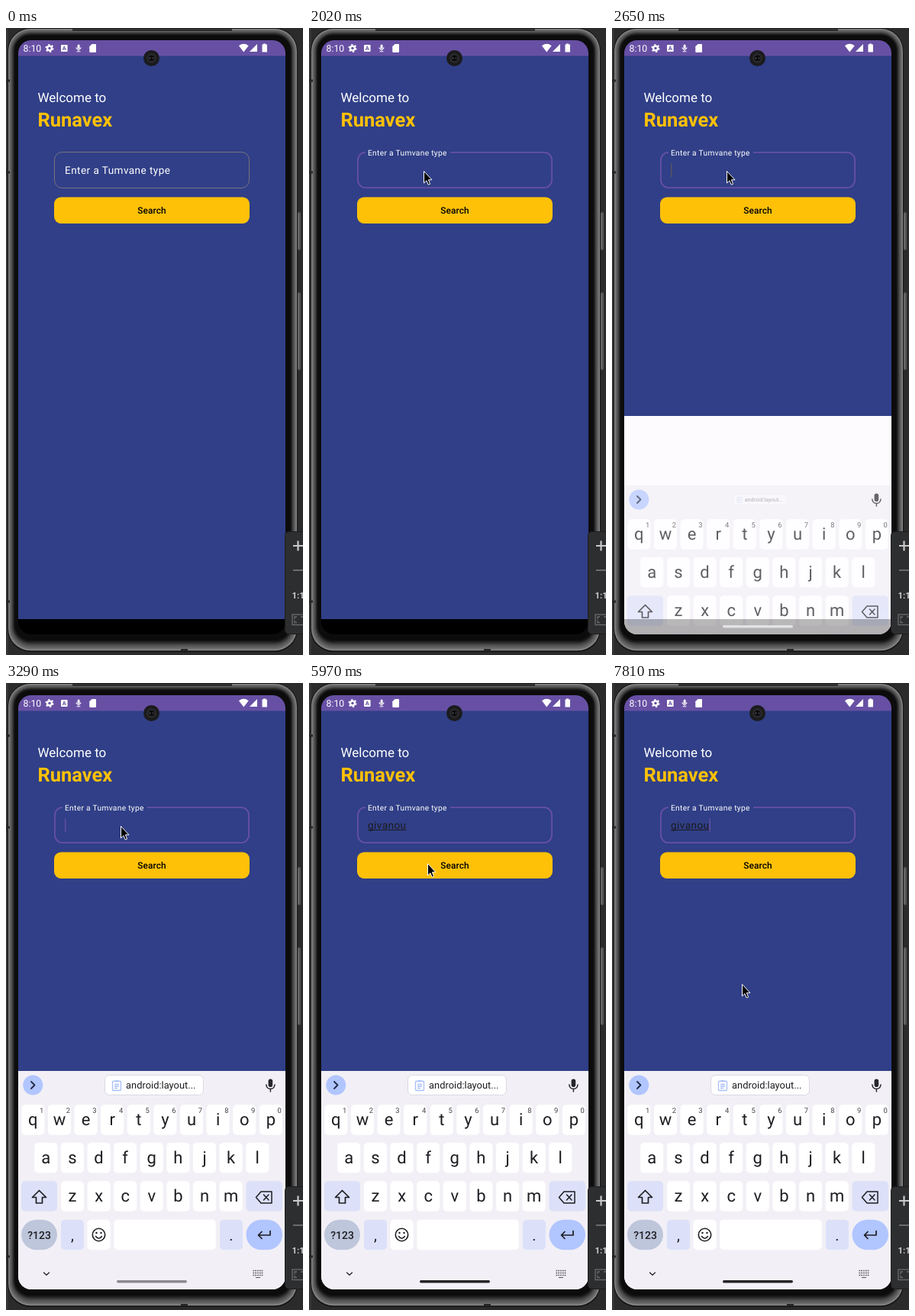
These frames come from a looping animation (389 px wide and 821 px high, 8000 ms). An HTML page:

```html
<!DOCTYPE html>
<html lang="en">
<head>
<meta charset="utf-8">
<title>Search screen</title>
<style>
  html, body { margin: 0; width: 100%; height: 100%; overflow: hidden; background: #2b2b2b; }
  svg { display: block; width: 389px; height: 821px; font-family: Roboto, sans-serif; }
  text { white-space: pre; text-rendering: geometricPrecision; }
  .mid { text-anchor: middle; }
  .line { fill: none; stroke-linecap: round; stroke-linejoin: round; }
</style>
</head>
<body>
<svg viewBox="0 0 389 821">
  <defs>
    <clipPath id="screen"><rect x="16" y="16" width="350" height="778" rx="17"/></clipPath>
    <clipPath id="btn"><rect x="63" y="221.4" width="256" height="34.6" rx="9"/></clipPath>
  </defs>

  <rect width="389" height="821" fill="#2b2b2b"/>
  <rect width="3" height="821" fill="#353535"/>
  <g id="body"></g>
  <path d="M87 2.5H296" stroke="#151515" stroke-width="2"/>
  <path d="M0 69H5M0 189H5M0 751H5M229 814.5H238" stroke="#262626" stroke-width="3"/>
  <g stroke="#555" stroke-width="4" stroke-linecap="round">
    <path d="M384 243V289M384 348V446"/>
    <path d="M383 243V289M383 348V446" stroke="#777" stroke-width="1"/>
  </g>

  <g clip-path="url(#screen)">
    <rect x="16" y="16" width="350" height="778" fill="#000"/>
    <rect x="16" y="36" width="350" height="738" fill="#303f87"/>
    <rect x="16" y="16" width="350" height="20.5" fill="#6750a4"/>

    <text x="22.5" y="31" font-size="12.3" fill="#fff">8:10</text>
    <g fill="#fff">
      <circle cx="57" cy="26.5" r="2.9" fill="none" stroke="#fff" stroke-width="2.3"/>
      <circle cx="57" cy="26.5" r="4.7" fill="none" stroke="#fff" stroke-width="1.7" stroke-dasharray="2.3 2.62"/>
      <rect x="72" y="22" width="8.6" height="9" rx="1"/>
      <text x="76.3" y="29.4" font-size="7.5" font-weight="700" fill="#6750a4" class="mid">A</text>
      <rect x="93.6" y="21.5" width="3" height="5.5" rx="1.5"/>
      <path class="line" d="M92 26L95 29L98 26M93 30.7H97" stroke="#fff" stroke-width="1.1"/>
      <path d="M112.5 21H117.2Q118 21 118 22V31Q118 32 117 32H110.3Q109.3 32 109.3 31V24.3Z"/>
      <path d="M305 23.2Q311.3 18.5 317.7 23.2L311.3 31.5Z"/>
      <path d="M329 21V31H319Z"/>
      <path d="M337 20.5H340V21.5H342V31.5H335.5V21.5H337Z"/>
    </g>

    <text x="41.5" y="97" font-size="17" fill="#fff">Welcome to</text>
    <text x="41.5" y="129" font-size="25.5" font-weight="700" fill="#ffc107">Runavex</text>

    <rect id="field" rx="10" fill="none"/>
    <rect id="gap" y="160" height="5" fill="#303f87"/>
    <text id="hint" font-size="13.6" letter-spacing=".42" fill="#fff">Enter a Tumvane type</text>
    <text id="typed" x="77" y="191" font-size="13.6" letter-spacing=".42" fill="#1c1b1f"></text>
    <rect id="under" x="77" y="192" height="1" fill="#1c1b1f"/>
    <rect id="caret" y="177" width="1.5" height="18"/>

    <rect x="63" y="221.4" width="256" height="34.6" rx="9" fill="#ffc107"/>
    <g clip-path="url(#btn)"><circle id="ripple" cx="155" cy="238" fill="#fff"/></g>
    <text x="191" y="243" font-size="11.9" font-weight="500" letter-spacing=".1" class="mid">Search</text>

    <g id="panel">
      <rect x="16" y="508" width="350" height="286" fill="#fefbff"/>
      <g id="keys">
        <rect x="16" y="508" width="350" height="290" fill="#f2f0f6"/>
        <circle cx="35.3" cy="526.5" r="13" fill="#b1c5ff"/>
        <path class="line" d="M33 522L37.5 526.5L33 531" stroke="#222b45" stroke-width="1.8"/>
        <g id="chip">
          <rect x="129.5" y="513.5" width="129" height="26" rx="6" fill="#fff" stroke="#d9d9e2"/>
          <g fill="none" stroke="#a9bff8" stroke-width="1.3">
            <rect x="139.5" y="521.5" width="11" height="12" rx="1"/>
            <path d="M142.5 521H147.5M142 525.5H148M142 528H148M142 530.5H146"/>
          </g>
          <text x="157" y="531" font-size="12.9" fill="#1d1d22">android:layout...</text>
        </g>
        <rect x="343.6" y="518.5" width="5.6" height="10.5" rx="2.8" fill="#26262b"/>
        <path class="line" d="M340.8 526Q341.5 531.5 346.4 531.5Q351.3 531.5 352 526M346.4 532V535" stroke="#26262b" stroke-width="1.5"/>
      </g>
      <rect id="scrim" x="16" y="774" width="350" height="20" fill="#000"/>
    </g>
    <rect id="handle" x="145" y="782" width="92" height="3.4" rx="1.7"/>
  </g>

  <circle cx="190.5" cy="39.5" r="10.5" fill="#1b1b1d"/>
  <circle cx="190.5" cy="39.5" r="6.5" fill="#29292c"/>
  <circle cx="190.5" cy="39.5" r="3.8" fill="#0c0c0e"/>
  <circle cx="188.5" cy="39.5" r="1" fill="#55565c"/>
  <circle cx="192.5" cy="39.5" r="1" fill="#45464c"/>

  <rect x="365.5" y="659.5" width="40" height="134" rx="5" fill="#2d2e30" stroke="#1d1d1f"/>
  <path d="M376 678H389M382.5 671.5V684.5" stroke="#c9c9c9" stroke-width="2.2"/>
  <path d="M376 710H389" stroke="#737373" stroke-width="1.8"/>
  <text x="374.5" y="747" font-size="11.5" font-weight="700" fill="#c9c9c9">1:1</text>
  <g fill="none" stroke="#6c6c6c" stroke-width="1.3">
    <rect x="375" y="768" width="17" height="13.5"/>
    <path d="M378 774V771H381M378 775.5V778.5H381M386 771H389"/>
  </g>

  <path id="cursor" d="M.5 .5V16L3.9 12.8L6.3 18.2L8.6 17.2L6.4 11.8H11Z" fill="#000" stroke="#fff" stroke-width="1" stroke-linejoin="round"/>
</svg>
<script>
const LOOP = 8000, STEP = 70;
const $ = id => document.getElementById(id);

function add(parent, tag, attrs, text) {
  const node = document.createElementNS('http://www.w3.org/2000/svg', tag);
  set(node, attrs);
  if (text) node.textContent = text;
  parent.append(node);
  return node;
}
function set(node, attrs) {
  for (const k in attrs) node.setAttribute(k, attrs[k]);
}

// Metal edge of the phone, from the outside in.
['#141414', '#868686', '#707070', '#636363', '#585858', '#4a4a4a', '#393939', '#262626', '#161616', '#0c0c0c'].forEach((fill, i) => {
  const d = i * 1.05;
  add($('body'), 'rect', { x: 2 + d, y: d, width: 380 - 2 * d, height: 817 - 2.6 * d, rx: 30 - d, fill });
});

const keys = $('keys'), PALE = '#dce1f9', INK = '#1d1d22';
function key(x, y, w, label, fill = '#fff', size = 22, rx = 5) {
  add(keys, 'rect', { x, y, width: w, height: 39.5, rx, fill });
  if (label) add(keys, 'text', { x: x + w / 2, y: y + 27, 'font-size': size, fill: INK, class: 'mid' }, label);
}
function icon(d, width = 1.7) {
  add(keys, 'path', { d, class: 'line', stroke: INK, 'stroke-width': width });
}
function row(letters, x, y) {
  [...letters].forEach((c, i) => key(x + i * 34.62, y, 30, c));
}
row('qwertyuiop', 20.3, 552.3);
[...'1234567890'].forEach((c, i) =>
  add(keys, 'text', { x: 46.7 + i * 34.62, y: 563, 'font-size': 9.5, fill: '#44444a', class: 'mid' }, c));
row('asdfghjkl', 37.3, 602);
row('zxcvbnm', 72, 652.3);
key(20, 652.3, 47, '', PALE);
key(314.5, 652.3, 47.5, '', PALE);
key(20, 702.7, 47, '', '#bec6dc', 14, 19.7);
add(keys, 'text', { x: 43.5, y: 727.5, 'font-size': 14, 'font-weight': 500, fill: INK, class: 'mid' }, '?123');
key(72, 702.7, 30, ',', PALE, 20);
key(106.5, 702.7, 30, '');
key(141.3, 702.7, 133.5, '');
key(280, 702.7, 30, '.', PALE, 20);
key(314.5, 702.7, 47.5, '', '#b1c5ff', 22, 19.7);
icon('M43.5 664.5L34.5 673.5H39.5V681H47.5V673.5H52.5Z');
icon('M334 666H348V681H334L327.5 673.5ZM337.5 670L344 677M344 670L337.5 677', 1.5);
icon('M346 717.5V723H331M335 718.5L330.5 723L335 727.5');
add(keys, 'circle', { cx: 121.5, cy: 722.5, r: 8.2, fill: 'none', stroke: INK, 'stroke-width': 1.6 });
icon('M118.5 720V720.1M124.5 720V720.1', 2.4);
icon('M117.5 724.5Q121.5 730 125.5 724.5', 1.5);
icon('M49.5 772L53 775.3L56.5 772', 1.2);
add(keys, 'path', { d: 'M323.5 769.5H336.5M323.5 772.5H336.5M323.5 775.5H336.5', fill: 'none', stroke: '#55555b', 'stroke-width': 1.5, 'stroke-dasharray': '1.7 1.1' });
add(keys, 'path', { d: 'M327 778.5H333', stroke: '#55555b', 'stroke-width': 1.2 });

const WORD = 'givanou';
const typeTimes = [4200, 4410, 4620, 4690, 4890, 5020, 5150];
const caretOn = [[2080, 2600], [3080, 3570], [4130, 5760], [6240, 6680], [7140, 8000]];
const path = [
  [230, 258, 555], [300, 217, 466], [580, 217, 466], [720, 198, 424], [860, 184, 373], [1000, 172, 312],
  [1140, 161, 236], [1280, 155, 196], [1420, 151, 190], [1480, 151, 190], [1550, 150, 187],
  [5690, 150, 187], [5830, 152, 214], [5970, 155, 236], [6670, 155, 236], [6880, 163, 290],
  [7000, 170, 322], [7510, 170, 322], [7650, 172, 362], [7790, 170, 394]
];
const handleTones = [[2300, '#6a6a6a'], [2400, '#b9b9b9'], [2650, '#e2e2e4'], [2930, '#b5b5b9'],
  [3290, '#8b8b90'], [3570, '#69696d'], [3640, '#505054'], [3920, '#252528']];

const clamp = v => Math.max(0, Math.min(1, v));
const span = (t, a, b) => clamp((t - a) / (b - a));
const mix = (a, b, p) => a + (b - a) * p;
const ease = p => p * p * (3 - 2 * p);

function at(t) {
  const i = path.findIndex(p => p[0] > t);
  if (i === 0) return path[0].slice(1);
  if (i < 0) return path[path.length - 1].slice(1);
  const a = path[i - 1], b = path[i], p = span(t, a[0], b[0]);
  return [mix(a[1], b[1], p), mix(a[2], b[2], p)];
}

function draw(t) {
  const stepped = Math.floor((t - 20) / STEP) * STEP + 20;
  const [cx, cy] = at(stepped);
  set($('cursor'), { transform: `translate(${cx} ${cy})`, visibility: t < 250 ? 'hidden' : 'visible' });

  // Outlined field: the hint floats up and the outline thickens.
  const f = ease(span(t, 1820, 2020)), w = mix(1, 1.8, f);
  set($('field'), {
    x: 63 + w / 2, y: 162 + w / 2, width: 256 - w, height: 48 - w,
    stroke: f > 0 ? '#6750a4' : '#79747e', 'stroke-width': w
  });
  set($('gap'), { x: 129 - 55 * f, width: 111 * f });
  set($('hint'), { transform: `translate(77 ${mix(191, 167, f)}) scale(${mix(1, .75, f)})` });

  const n = typeTimes.filter(k => k <= t).length;
  const typed = $('typed');
  if (typed.textContent !== WORD.slice(0, n)) typed.textContent = WORD.slice(0, n);
  const width = n ? typed.getComputedTextLength() : 0;
  set($('under'), { width });
  const on = caretOn.some(([a, b]) => t >= a && t < b);
  const ghost = t >= 2600 && t < 2720;
  set($('caret'), { x: 77 + width, fill: ghost ? '#5b5660' : '#6750a4', opacity: on || ghost ? .9 : 0 });

  const grow = ease(span(t, 6240, 6560));
  set($('ripple'), { r: 170 * grow, opacity: .2 * span(t, 6240, 6320) * (1 - span(t, 6780, 7140)) });

  // Keyboard slides in over three steps.
  const k = t < 2720 ? 0 : t < 2790 ? .7 : 1;
  set($('panel'), { visibility: t < 2650 ? 'hidden' : 'visible' });
  set($('keys'), { transform: `translate(0 ${91 * (1 - k)})`, opacity: mix(.7, 1, k) });
  set($('chip'), {
    transform: `translate(194 526.5) scale(${mix(.55, 1, k)}) translate(-194 -526.5)`,
    opacity: mix(.45, 1, k)
  });
  set($('scrim'), { opacity: mix(.28, 0, k) });

  const tone = handleTones.filter(h => h[0] <= t).pop();
  set($('handle'), { fill: tone ? tone[1] : 'none' });
}

const start = performance.now();
function frame() {
  draw((performance.now() - start) % LOOP);
  requestAnimationFrame(frame);
}
frame();
</script>
</body>
</html>
```
